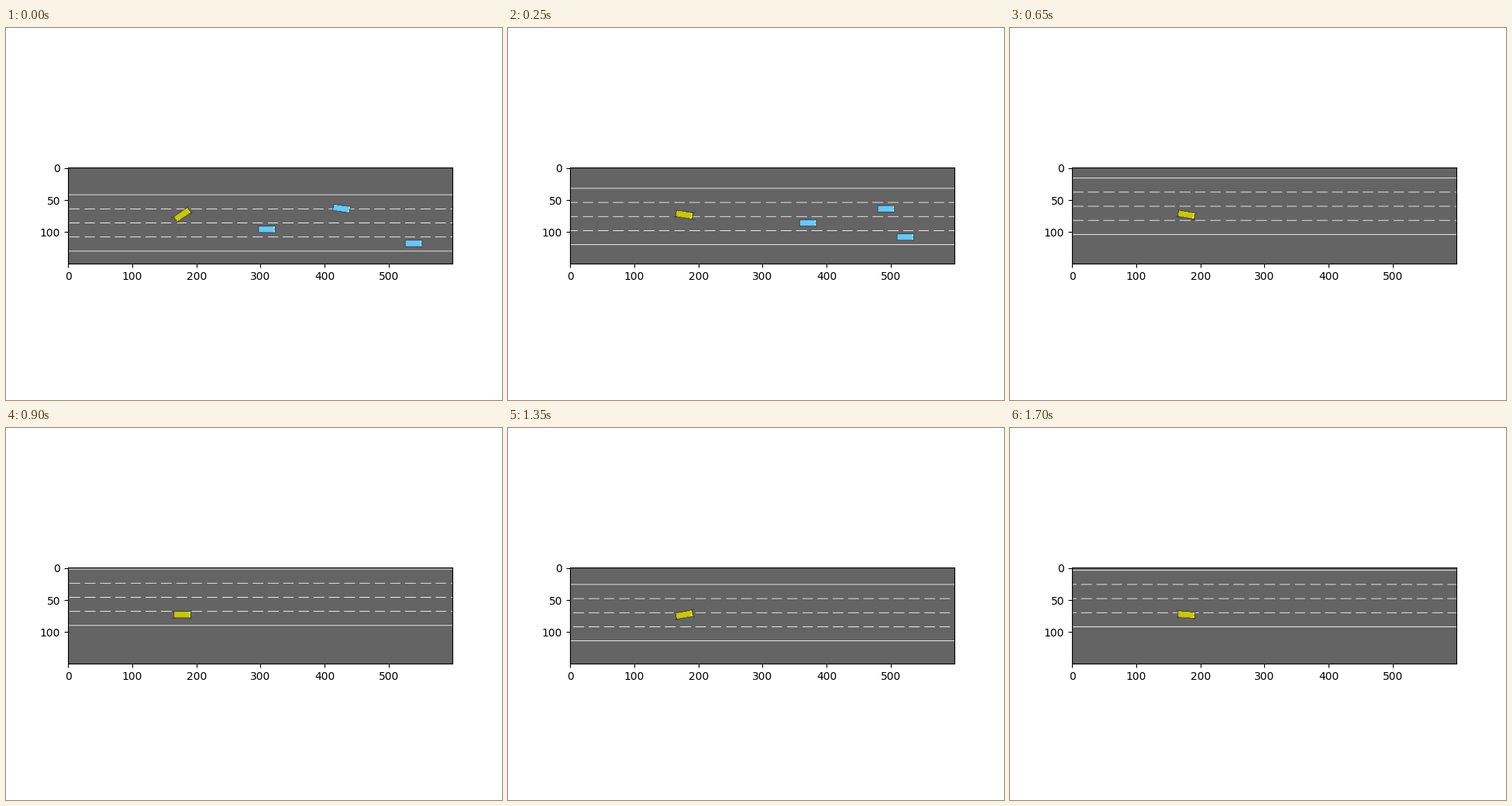
Animation, 640 px wide and 480 px high, one loop 1.75 s. Source, as a matplotlib script:

```python
import numpy as np
import matplotlib.pyplot as plt
from matplotlib.animation import FuncAnimation

FRAMES, INTERVAL = 35, 50
W, H = 600, 150
PX = 5.5                     # image pixels per metre
LANE = 22                    # lane width
DASH_STEP, DASH_LEN = 4.33 * PX, 3 * PX
CAR_L, CAR_W = 27, 11

GREY, DARK, WHITE = (100, 100, 100), (60, 60, 60), (255, 255, 255)
YELLOW, BLUE = (200, 200, 0), (100, 200, 255)

# Key points of the drive: step, swerves made, dashes passed
STEP, SWERVES, PASSED = zip(
    (0, -0.2, -0.06), (5, 0.923, 23.19), (13, 3.051, 59.96),
    (18, 4.25, 82.92), (23, 5.504, 106.19), (30, 7.3, 138.75),
    (34, 8.179, 157.42))

# Other cars: start x, drift per step, lane, share of a lane still to cross
TRAFFIC = [(310.5, 12.2, 2, 0), (427, 13.4, 1, 0.5), (539.5, -3.2, 3, 0)]
BRAKING = 1.9

YY, XX = np.mgrid[0:H, 0:W] + 0.5


def lighten(color):
    return tuple(min(int(c / 0.68), 255) for c in color)


def to_local(x, y, cx, cy, deg):
    a = np.radians(deg)
    dx, dy = x - cx, y - cy
    return dx * np.cos(a) + dy * np.sin(a), dy * np.cos(a) - dx * np.sin(a)


def fill(img, u, v, x, y, w, h, color):
    img[(u >= x) & (u < x + w) & (v >= y) & (v < y + h)] = color


def draw_car(img, cx, cy, deg, color, steer=None):
    if abs(deg) < 2:
        deg = 0
    u, v = to_local(XX, YY, cx, cy, deg)
    left, top = -CAR_L / 2, -CAR_W / 2
    fill(img, u, v, left, top, CAR_L, CAR_W, DARK)
    fill(img, u, v, left + 1, top + 1, CAR_L - 2, CAR_W - 2, color)
    for lamp in (top + 1, top + 7):
        fill(img, u, v, left + CAR_L - 3, lamp, 2, 3, lighten(color))
    if steer is None:
        return
    for x, angle in ((left, 0), (-left, steer)):
        for y in (top, -top):
            tu, tv = to_local(u, v, x, y, angle)
            fill(img, tu, tv, -2.5, -0.5, 5, 1, DARK)


def draw_road(img, top, passed):
    dashed = (np.arange(W) + passed * DASH_STEP) % DASH_STEP <= DASH_LEN
    for line in range(5):
        y = top + line * LANE
        if 0 <= y < H:
            img[y, slice(None) if line in (0, 4) else dashed] = WHITE


def scene(i):
    img = np.empty((H, W, 3), np.uint8)
    img[:] = GREY
    swing = 2 * np.pi * np.interp(i, STEP, SWERVES)
    settle = np.exp(-i)          # the first hard turn fades out
    top = int(round(22.5 - 20.5 * np.sin(swing)))
    draw_road(img, top, np.interp(i, STEP, PASSED))

    for x, drift, lane, gap in TRAFFIC:
        x += drift * i + BRAKING * i * (i - 5)
        y = top + (lane + 0.5 - gap * settle) * LANE
        draw_car(img, x, y, 16 * gap * settle, BLUE)

    heading = 10 * np.cos(swing) - 38 * settle
    steer = -20 * np.sin(swing) - 55 * settle
    draw_car(img, 178.5, 73.6, heading, YELLOW, steer)
    return img


fig, ax = plt.subplots(figsize=(6.4, 4.8), dpi=100)
view = ax.imshow(scene(0))


def update(i):
    view.set_data(scene(i))
    return (view,)


anim = FuncAnimation(fig, update, frames=FRAMES, interval=INTERVAL,
                     repeat=True, repeat_delay=0, blit=False)
plt.show()
```
